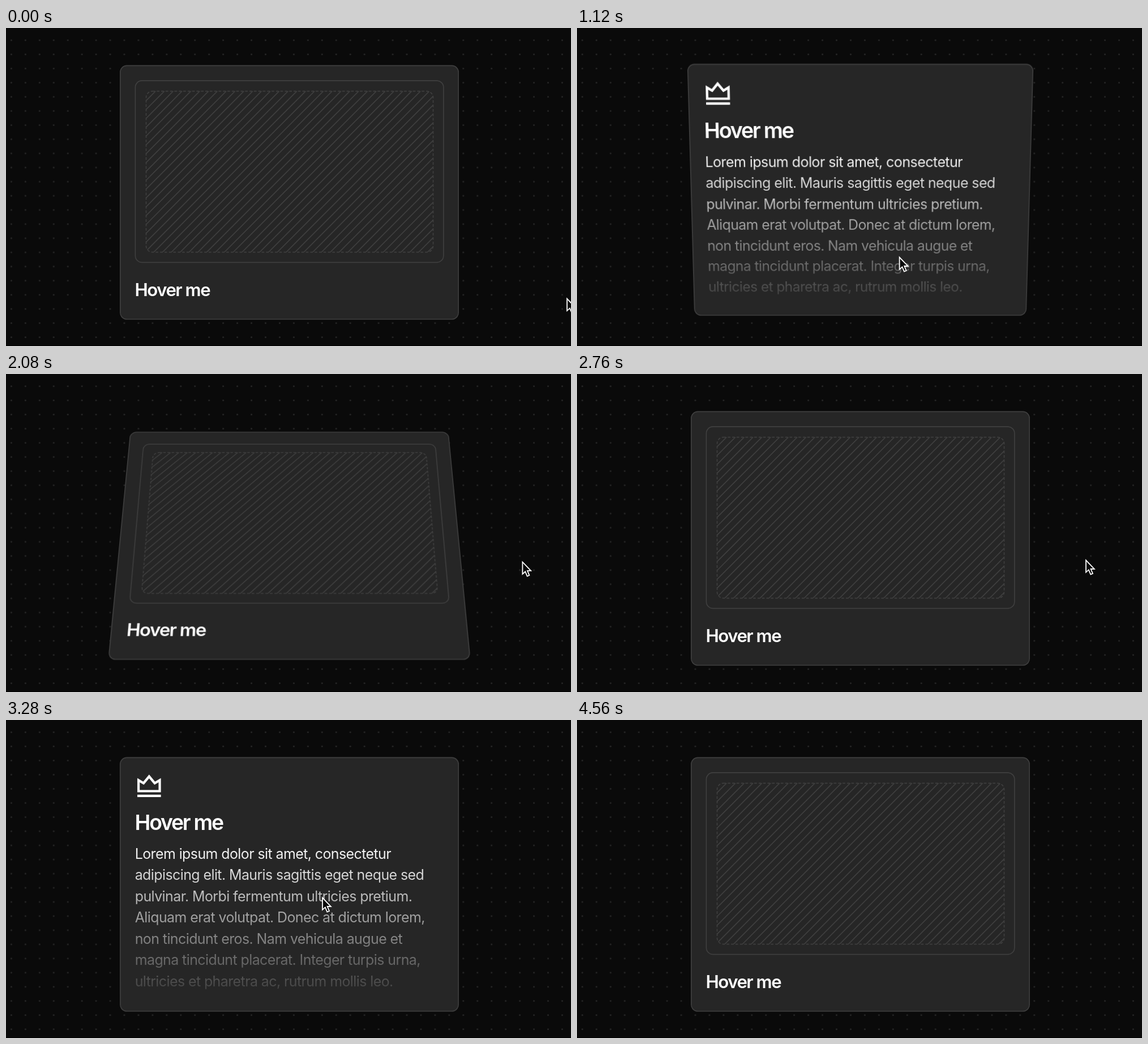
An HTML page that plays this animation: 998 px wide and 561 px high, repeating every 4720 ms.

```html
<!DOCTYPE html>
<html lang="en">
<head>
<meta charset="utf-8">
<title>Flip card</title>
<style>
  html, body { margin: 0; width: 100%; height: 100%; overflow: hidden; background: #0a0a0a; }
  svg { position: absolute; left: 0; top: 0; width: 998px; height: 561px; }
  .face { transform-origin: 500.5px 290px; }
  .line { fill: none; stroke: #404040; stroke-width: 1.56; }
  .panel { fill: #262626; stroke: #404040; stroke-width: 1.56; }
  text { font-family: Inter, sans-serif; fill: #fff; }
  .title { font-weight: 600; }
  #copy text { font-size: 24.95px; letter-spacing: -0.023em; fill: url(#fade); }
</style>
</head>
<body>
<svg viewBox="0 0 998 561">
  <defs>
    <pattern id="dots" x="-3.1" y="9.1" width="24.95" height="24.95" patternUnits="userSpaceOnUse">
      <circle cx="12.5" cy="12.5" r="1.5" fill="#262626"/>
    </pattern>
  </defs>
  <rect width="998" height="561" fill="#0a0a0a"/>
  <rect width="998" height="561" fill="url(#dots)"/>
  <rect y="560" width="998" height="1"/>
</svg>

<svg class="face" id="front" viewBox="0 0 998 561">
  <clipPath id="inside"><rect x="247.5" y="111.5" width="507" height="284" rx="11"/></clipPath>
  <rect class="panel" x="201.8" y="66.4" width="597.4" height="447.4" rx="11.7"/>
  <rect class="line" x="228.4" y="92.9" width="544.4" height="320.6" rx="11.7"/>
  <path class="line" id="hatch" clip-path="url(#inside)"/>
  <rect class="line" x="247.5" y="111.5" width="507" height="284" rx="11" stroke-dasharray="4.7 3.1"/>
  <text class="title" x="227.5" y="473" font-size="31.2" letter-spacing="-0.048em">Hover me</text>
</svg>

<svg class="face" id="back" viewBox="0 0 998 561">
  <linearGradient id="fade" gradientUnits="userSpaceOnUse" x1="0" y1="217.6" x2="0" y2="479.6">
    <stop stop-color="#fff"/><stop offset="1" stop-color="#404040"/>
  </linearGradient>
  <rect class="panel" x="201.8" y="66.4" width="597.4" height="447.4" rx="11.7"/>
  <path fill="#fff" fill-rule="evenodd" transform="translate(227.9 92.2) scale(2.08)"
    d="M2 19H22V21H2ZM2 5L7 8L12 2L17 8L22 5V17H2ZM4 8.53V15H20V8.53L16.5 10.63L12 5.2L7.5 10.63Z"/>
  <text class="title" x="227.5" y="194" font-size="37.4" letter-spacing="-0.06em">Hover me</text>
  <g id="copy"></g>
</svg>

<svg viewBox="0 0 998 561">
  <path id="cursor" d="M1 1.6V22.8L5.8 18.4L9.3 26.6L13 25L9.6 17H15.8Z" fill="#0a0a0a" stroke="#fff" stroke-width="1.8"/>
</svg>

<script>
const LOOP = 4720, STEP = 40, FLIP = 500;
const flips = [753, 1795, 2795, 4010];
// time, x, y of the pointer tip
const path = [
  [0, 990, 476], [610, 990, 476], [750, 800, 430], [920, 555, 403], [1140, 570, 403],
  [1715, 570, 403], [1795, 800, 372], [1890, 975, 345], [2120, 898, 327],
  [2760, 898, 327], [2795, 800, 322], [2960, 558, 312],
  [3940, 558, 312], [4010, 800, 328], [4080, 1010, 340], [LOOP, 1010, 340]
];
const lines = [
  'Lorem ipsum dolor sit amet, consectetur',
  'adipiscing elit. Mauris sagittis eget neque sed',
  'pulvinar. Morbi fermentum ultricies pretium.',
  'Aliquam erat volutpat. Donec at dictum lorem,',
  'non tincidunt eros. Nam vehicula augue et',
  'magna tincidunt placerat. Integer turpis urna,',
  'ultricies et pharetra ac, rutrum mollis leo.'
];
const $ = id => document.getElementById(id);

$('copy').innerHTML = lines.map((s, i) =>
  `<text x="227.7" y="${245 + i * 37.43}">${s}</text>`).join('');

let hatch = '';
for (let sum = 360; sum < 1160; sum += 15.6) hatch += `M${sum - 400} 400L${sum - 105} 105`;
$('hatch').setAttribute('d', hatch);

// cubic-bezier(.4, 0, .2, 1)
function ease(x) {
  if (x <= 0) return 0;
  if (x >= 1) return 1;
  let lo = 0, hi = 1, s;
  for (let i = 0; i < 24; i++) {
    s = (lo + hi) / 2;
    const r = 1 - s;
    if (1.2 * s * r * r + 0.6 * s * s * r + s * s * s < x) lo = s; else hi = s;
  }
  return s * s * (3 - 2 * s);
}

function pointer(t) {
  const i = path.findIndex(p => p[0] > t);
  const a = path[i - 1], b = path[i], k = (t - a[0]) / (b[0] - a[0]);
  return [a[1] + (b[1] - a[1]) * k, a[2] + (b[2] - a[2]) * k];
}

function pose(face, angle) {
  const shown = Math.abs(angle) < 90;
  face.style.display = shown ? 'block' : 'none';
  face.style.transform = angle ? `perspective(1564px) rotateX(${angle}deg)` : 'none';
}

function draw(t) {
  const turn = flips.reduce((sum, at, i) => sum + (i % 2 ? -1 : 1) * ease((t - at) / FLIP), 0);
  pose($('front'), turn * 180);
  pose($('back'), turn * 180 - 180);
  $('cursor').setAttribute('transform', `translate(${pointer(t)})`);
}

const start = performance.now();
function tick() {
  const t = (performance.now() - start) % LOOP;
  draw(Math.floor(t / STEP) * STEP);
  requestAnimationFrame(tick);
}
draw(0);
requestAnimationFrame(tick);
</script>
</body>
</html>
```
